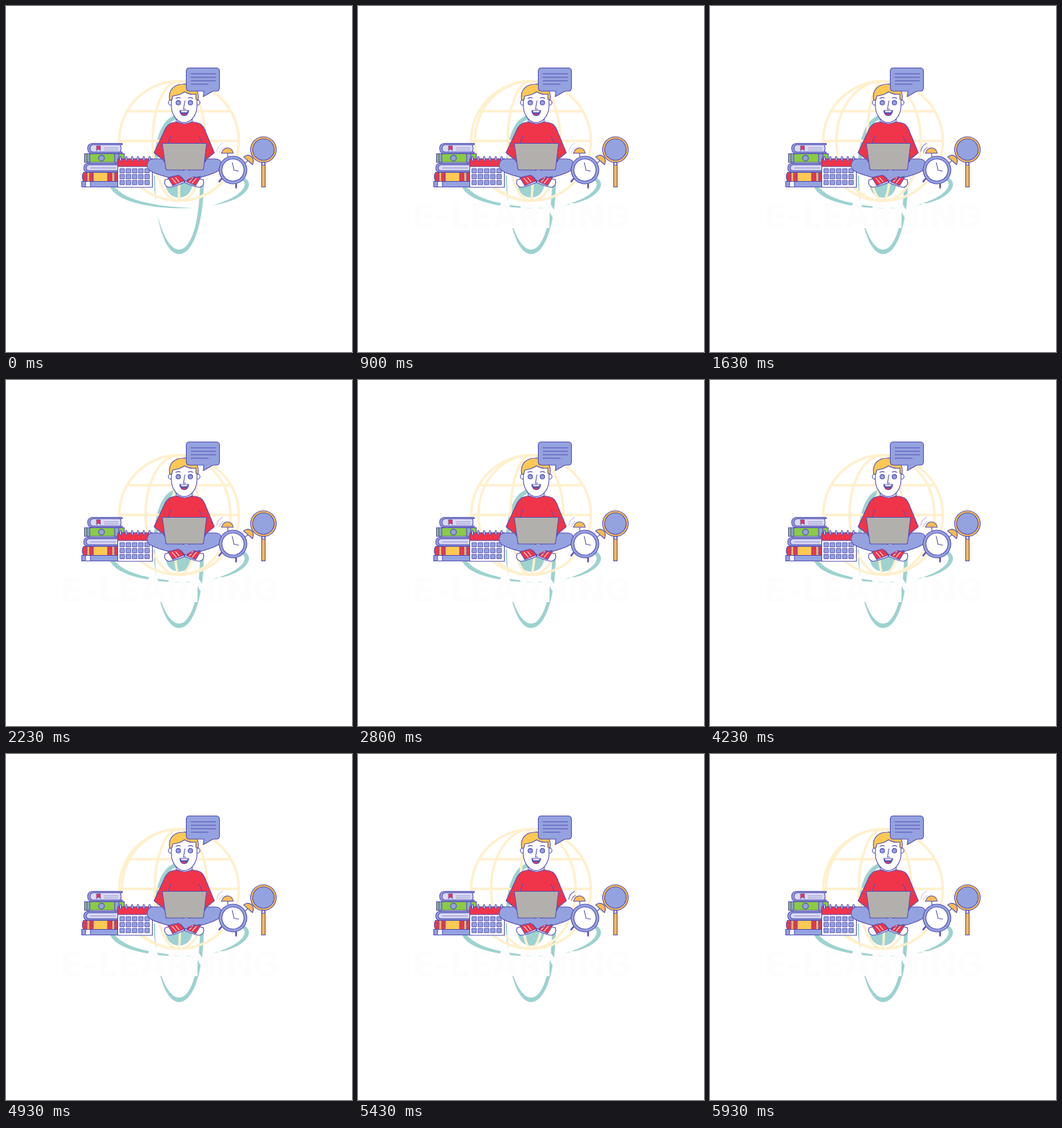
Animation, 500 px wide and 500 px high, one loop 6010 ms. Source, as an HTML page:

```html
<!DOCTYPE html>
<html lang="en">
<head>
<meta charset="utf-8">
<title>E-learning</title>
<style>
  html, body { margin: 0; width: 100%; height: 100%; overflow: hidden; background: #fff; }
  svg { display: block; width: 100%; height: 100%; }
  .ink { stroke: #5650b4; stroke-width: 1.1; stroke-linejoin: round; stroke-linecap: round; }
  .line { fill: none; }
  .blue { fill: #94a2df; }
  .pale { fill: #d9daf2; }
  .red { fill: #f0344a; }
  .gold { fill: #fcbd4e; }
  .hair { fill: #fdc955; }
  .white { fill: #fff; }
  .teal { fill: #9dd2d0; }
  .globe { fill: none; stroke: #fff0cd; stroke-width: 3.6; }
  #title { font: 800 49px Inter, "Open Sans", sans-serif; letter-spacing: .8px; fill: #fdfdfd; }
</style>
</head>
<body>
<svg viewBox="0 0 500 500">
  <!-- orbits and nucleus -->
  <g class="teal">
    <path d="M219 302C225 338 237 358.500 250 358.500C272 358.500 286 310 286 250L280.500 250C280 312 268 352 250 352C240 352 228 338 219 302Z"/>
    <path d="M214 225C216 182 231 156 250 158L250 164C237 162 222 184 219 225Z"/>
    <path d="M213.500 245L215.500 245Q215.500 270 217.500 284Q213.500 266 213.500 245Z"/>
    <path d="M149 257C153 281 205 294.500 271 292C215 290 165 280 155 257Z"/>
    <path d="M298 288C335 283 352 268 351 257C350 250 345 247 336 245V249C342 251 345 254 345 258C344 268 328 280 298 288Z"/>
    <circle cx="250" cy="258" r="19"/>
  </g>

  <g class="globe">
    <circle cx="250" cy="195" r="86.500"/>
    <path d="M176 152H324M163 195H337M176 238H324"/>
    <g id="meridians"></g>
  </g>

  <text id="title" x="237" y="320.500" text-anchor="middle">E-LEARNING</text>

  <!-- books -->
  <g class="ink">
    <path class="blue" d="M109.500 253.500H163V261.500H109.500Z"/>
    <path class="white" d="M115 253.500h7v8h-7Z"/>
    <path class="red" d="M112 240.500H162V253.500H112Q108.500 247 112 240.500Z"/>
    <path class="hair" d="M126 240.500h21v13h-21Z"/>
    <path class="gold" d="M117 240.500h4v13h-4ZM153 240.500h4v13h-4Z"/>
    <path class="blue" d="M162 227.500H118Q112.500 228 112.500 234T118 240H162Z"/>
    <path class="pale" d="M162 229.500H120Q116 230 116 234T120 238H162Z"/>
    <path class="line" d="M122 234H158" stroke-width=".6"/>
    <path fill="#8acb45" d="M113.500 213.500H171V226H113.500Z"/>
    <path class="blue" d="M117 213.500h4v12.500h-4ZM157 213.500h6v12.500h-6Z"/>
    <circle class="blue" cx="138" cy="219.800" r="4.200"/>
    <path class="blue" d="M168 198.500H125Q118 199 118 206T125 213H168V211H164Q167 206 164 200.500H168Z"/>
    <path class="pale" d="M165 200.500H126Q121.500 201 121.500 206T126 211H165Q167.500 206 165 200.500Z"/>
    <path class="red" d="M131 202h5.500v7l-2.700-2-2.800 2Z" stroke-width=".6"/>
    <path class="line" d="M142 205H162M142 208H162" stroke-width=".5"/>
  </g>

  <!-- calendar -->
  <g class="ink">
    <path class="white" d="M161.500 221H211.500V262H161.500Z"/>
    <path class="red" d="M161.500 221H211.500V232H161.500Z"/>
    <g id="rings" class="white"></g>
    <g id="days" class="blue" stroke-width=".9"></g>
  </g>

  <!-- student -->
  <g class="ink">
    <path class="white" d="M246 160H269V176H246Z"/>
    <path class="red" d="M237 170Q242 167.500 248 167.500Q258 173 268 167.500Q276 168 281 170.500Q286 174 289 183L301 212L290 221L286 226H230L225 221L214 212L228 182Q231 174 237 170Z"/>
    <path class="line" d="M234 199L238 188M284 199L279 188"/>
    <circle class="white" cx="238.500" cy="139.500" r="3.800"/>
    <circle class="white" cx="276.500" cy="139.500" r="3.800"/>
    <path class="white" d="M239 128Q239 121 257 121T276 128V144C276 157 268 168.500 257.500 168.500S239 157 239 144Z"/>
    <path class="hair" d="M236.500 136C234 121 243 113 256 113C271 112 280 122 277.500 136L274.500 135V127Q266 129 258 124Q251 129 241 130L239.500 136Z"/>
    <path class="line" d="M245.500 133.500Q249 131.500 252 133M263.500 133Q267 131.500 270 133.500M258.500 137L256.500 149H259.500"/>
    <circle class="blue" cx="249" cy="139.800" r="3.200"/>
    <circle class="blue" cx="266.500" cy="139.800" r="3.200"/>
    <path fill="#5650b4" d="M251 151H264Q263 158.500 257.500 158.500T251 151Z"/>
    <path class="white" d="M252.500 151.500H262.500L261.500 153.500H253.500Z" stroke="none"/>
    <path class="red" d="M254 156.500Q257.500 154.500 261 156.500Q257.500 159 254 156.500Z" stroke="none"/>

    <path class="blue" d="M226 221H213C202 221 201 235 210 239Q217 243 236 248L251 253L263 240L231 228Z"/>
    <path class="blue" d="M290 221H302C314 221 315 235 305 239Q298 243 280 248L262 253.500L252 243L286 228Z"/>
    <path class="white" d="M230 251Q227 259 235 262Q241 262 258 255L254 246Z"/>
    <path class="red" d="M234 248L253 243.500L257 253L241 259.500Z"/>
    <path class="line" d="M240 249L246 256M245 248L250 254" stroke="#fff"/>
    <path class="white" d="M285 251Q288 259 280 262Q274 262 258 255L262 246Z"/>
    <path class="red" d="M281 248L264 246L261 254L274 259.500Z"/>
    <path class="line" d="M275 249L269 256M270 248L265 254" stroke="#fff"/>
    <path class="blue" d="M240 238H274L282 241L259 252L253 246Z" stroke="none"/>
    <path class="line" d="M251 246L259 253L281 246"/>
    <path fill="#b2b0ad" d="M227.500 198.500H288Q290 198.500 289.700 200L285.500 235.500Q285 237 283.500 237H233Q231.500 237 231 235.500L226 200Q226 198.500 227.500 198.500Z"/>
  </g>

  <!-- speech bubble -->
  <g class="ink">
    <path class="blue" d="M265 89.500H303.500Q308.500 89.500 308.500 94.500V118Q308.500 123 303.500 123H299L285 131L286 123H265Q260.500 123 260.500 118V94.500Q260.500 89.500 265 89.500Z"/>
    <path class="line" d="M267.500 98H303M267.500 103H303M267.500 108H303M267.500 113H292"/>
  </g>

  <!-- alarm clock -->
  <g class="ink" transform="translate(328 237) rotate(20)">
    <path class="line" d="M-11 17L-13 22.500M11 17L13 22.500" stroke-width="2.400"/>
    <path class="line" d="M-13 -15L-16 -21M13 -15L16 -21"/>
    <path class="gold" id="bell" d="M-24 -17C-24 -29 -13 -31 -8 -23Z"/>
    <path class="gold" d="M24 -17C24 -29 13 -31 8 -23Z"/>
    <circle class="blue" r="20"/>
    <circle class="white" r="16"/>
  </g>
  <path class="ink line" d="M327 226L329.500 237.500L336 238.500"/>
  <g id="ring" class="ink line">
    <path d="M304.500 210Q305.500 202 313 198.500"/>
    <path d="M308.500 212Q309 207 314 204.500"/>
  </g>

  <!-- magnifier -->
  <g class="ink">
    <path class="gold" d="M369.500 226H374.500V261.500H369.500Z"/>
    <path class="white" d="M370 226H374V230H370Z"/>
    <circle class="gold" cx="372" cy="207.500" r="18.500"/>
    <circle class="blue" cx="372" cy="207.500" r="15.500"/>
  </g>
</svg>
<script>
  const LOOP = 6010, BEAT = 1000, REVEAL = 600;
  const $ = id => document.getElementById(id);

  function add(parent, tag, attrs) {
    const el = document.createElementNS("http://www.w3.org/2000/svg", tag);
    for (const k in attrs) el.setAttribute(k, attrs[k]);
    return parent.appendChild(el);
  }

  for (let i = 0; i < 6; i++)
    add($("rings"), "rect", { x: 164.5 + i * 8.4, y: 217.5, width: 2, height: 6.5, rx: 1 });

  for (let i = 0; i < 15; i++)
    add($("days"), "rect", {
      x: 165 + (i % 5) * 9, y: 235 + Math.floor(i / 5) * 8.5, width: 6.2, height: 6.2
    });

  const meridians = Array.from({ length: 4 }, () => add($("meridians"), "path", {}));

  // Signed half-width of a meridian, k = -2..2 from edge to edge.
  function bulge(k) {
    const a = Math.abs(k);
    return Math.sign(k) * (38 * a + 5.25 * a * (a - 1));
  }

  function drawGlobe(phase) {
    meridians.forEach((m, i) => {
      const w = bulge(i - 1 - phase);
      m.setAttribute("d",
        `M250 108.5A${Math.max(Math.abs(w), .01)} 86.5 0 0 ${w > 0 ? 1 : 0} 250 281.5`);
    });
  }

  function draw(now) {
    const t = now % LOOP;
    const phase = (t % BEAT) / BEAT;
    drawGlobe(phase);
    $("ring").style.opacity = .25 + .7 * Math.sin(Math.PI * phase) ** 4;

    const p = Math.min(1, Math.max(0, (t - 30) / REVEAL));
    const rest = (1 - p) ** 3;
    $("title").setAttribute("transform", `translate(0 ${36 * rest})`);
    $("title").style.opacity = 1 - rest;
  }

  const start = performance.now();
  function tick() {
    draw(performance.now() - start);
    requestAnimationFrame(tick);
  }
  tick();
</script>
</body>
</html>
```
